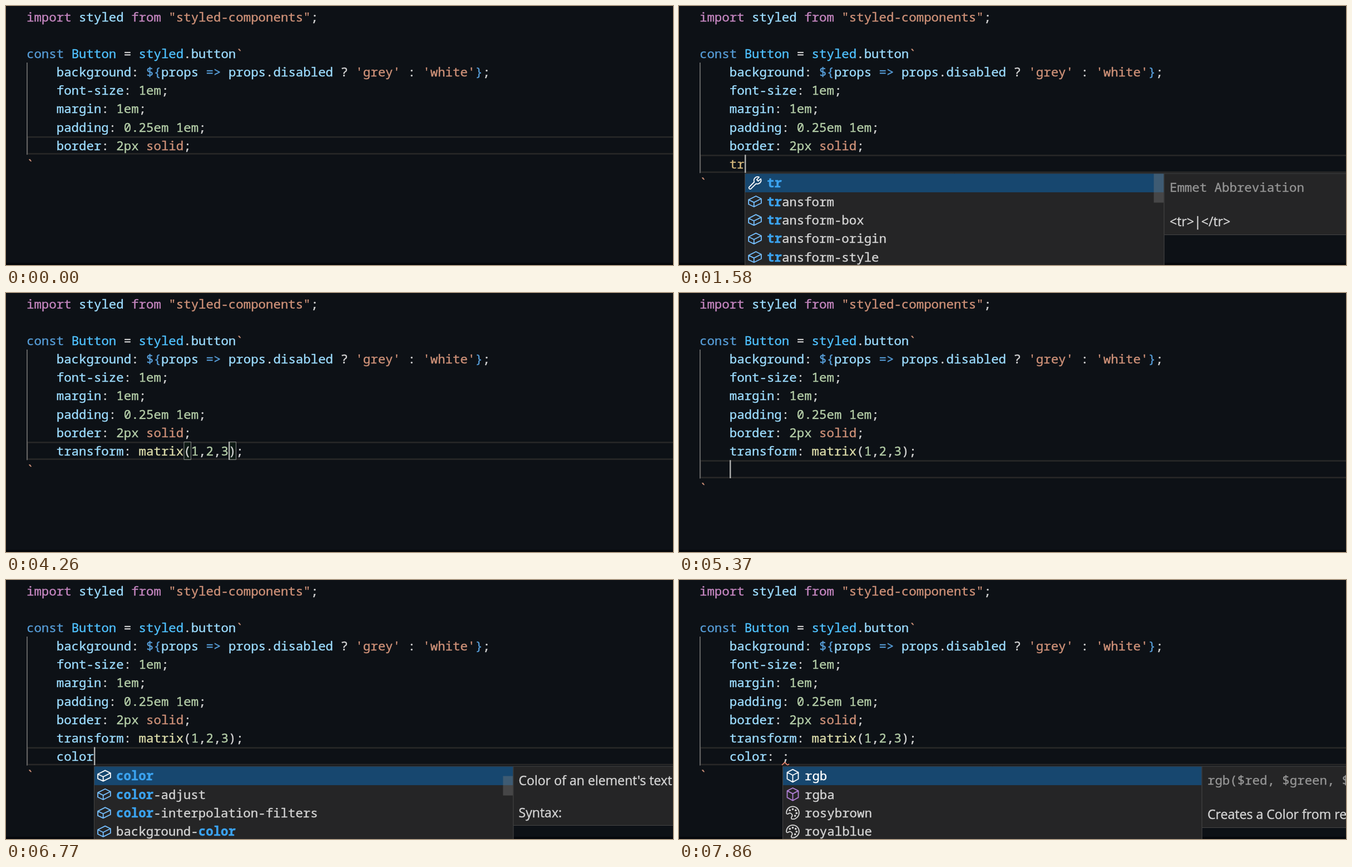
These frames come from a looping animation (1199 px wide and 467 px high, 8000 ms). An HTML page with a canvas:

```html
<!DOCTYPE html>
<html lang="en">
<head>
<meta charset="utf-8">
<title>Editor</title>
<style>
html, body { margin: 0; width: 100%; height: 100%; overflow: hidden; background: #0d1116; }
canvas { display: block; width: 1199px; height: 467px; }
</style>
</head>
<body>
<canvas id="stage"></canvas>
<script>
const W = 1199, H = 467, LOOP = 8000;
const LEFT = 37, ADV = 13.44, TOP = 2.8, LINE = 33.17, ROW = 33.4;
const MONO = '22.4px "Noto Sans Mono", "DejaVu Sans Mono", monospace';
const SANS = '23.1px "Open Sans", "Noto Sans", sans-serif';
const C = {
  key: '#c586c0', prop: '#9cdcfe', str: '#ce9178', kw: '#569cd6', name: '#4fc1ff',
  text: '#d4d4d4', num: '#b5cea8', fn: '#dcdcaa', tag: '#d7ba7d',
  hit: '#3ba3f0', field: '#75beff', method: '#b180d7', error: '#f0846c'
};

const canvas = document.getElementById('stage');
const dpr = window.devicePixelRatio || 1;
canvas.width = W * dpr;
canvas.height = H * dpr;
const ctx = canvas.getContext('2d');

const colX = col => LEFT + col * ADV;
const rowY = row => TOP + row * LINE;

// Code lines are flat lists: colour, text, colour, text, ...
const rule = (prop, ...value) => ['prop', '    ' + prop, 'text', ': ', ...value, 'text', ';'];
const typed = (word, color = 'text') => [color, '    ' + word];
const matrix = args => rule('transform', 'fn', 'matrix', 'text', '(',
  ...[...args].flatMap(ch => [ch === ',' ? 'text' : 'num', ch]), 'text', ')');

const BASE = [
  ['key', 'import ', 'prop', 'styled ', 'key', 'from ', 'str', '"styled-components"', 'text', ';'],
  [],
  ['kw', 'const ', 'name', 'Button ', 'text', '= ', 'name', 'styled', 'text', '.', 'prop', 'button', 'str', '`'],
  rule('background', 'kw', '${', 'prop', 'props ', 'kw', '=> ', 'prop', 'props', 'text', '.',
    'prop', 'disabled ', 'text', '? ', 'str', "'grey' ", 'text', ': ', 'str', "'white'", 'kw', '}'),
  rule('font-size', 'num', '1em'),
  rule('margin', 'num', '1em'),
  rule('padding', 'num', '0.25em 1em'),
  rule('border', 'num', '2px ', 'str', 'solid')
];

const list = (x, icons, labels, more) => ({ x, icons: icons.split(' '), labels: labels.split(' '), hit: '', ...more });

const tagList = list(118, 'wrench field field field field',
  'tr transform transform-box transform-origin transform-style',
  { hit: 'tr', bar: [1, 52], detail: 'Emmet Abbreviation', doc: '<tr>|</tr>' });
const transformList = hit => list(colX(4 + hit.length), 'field field field field field',
  'transform transform-box transform-origin transform-style ' + (hit === 'tra' ? 'translate' : 'transition'),
  { hit, bar: [1, 52], info: "A two-dimensional transformation is applied" });
const valueList = list(238, 'value value value value value',
  'matrix() matrix3d() none perspective() rotate()', { bar: [48, 130] });
const colorList = hit => list(hit === 'co' ? 118 : colX(4 + hit.length), 'field field field field',
  'color color-adjust color-interpolation-filters ' + (hit === 'color' ? 'background-color' : 'column-count'),
  { hit, bar: [18, 35], info: "Color of an element's text" });
const rgbList = list(186, 'method method color color', 'rgb rgba rosybrown royalblue',
  { detail: 'rgb($red, $green, $blue)', doc: 'Creates a Color from red, green, blue' });

const START = { row: 7, col: 22, caret: false, extra: [], popup: null, wave: null, pair: null };
const done = matrix('1,2,3');
const type = (line, col, more) => ({ extra: [line], col, caret: true, ...more });
const args = s => type(matrix(s), 22 + s.length, { pair: [21, 22 + s.length] });
const next = (line, col, more) => ({ extra: [done, line], col, caret: true, ...more });

const EVENTS = [
  [180, { caret: true }],
  [650, { caret: false }],
  [980, type([], 4, { row: 8 })],
  [1380, type(typed('t'), 5)],
  [1480, type(typed('tr', 'tag'), 6)],
  [1580, { popup: tagList }],
  [1640, type(typed('tra'), 7, { popup: transformList('tra') })],
  [1760, type(typed('tran'), 8, { popup: transformList('tran') })],
  [2130, { wave: [9, 0] }],
  [2190, { caret: false }],
  [2490, type(typed('transform', 'prop'), 13, { popup: null })],
  [2550, type(rule('transform'), 15, { popup: valueList })],
  [2860, { wave: [8, 15] }],
  [2980, { caret: false }],
  [3220, { ...args(''), popup: null, wave: null, pair: null }],
  [3280, { pair: [21, 22] }],
  [3660, args('1')],
  [3960, args('1,')],
  [4060, args('1,2')],
  [4160, args('1,2,')],
  [4260, args('1,2,3')],
  [4770, { caret: false }],
  [4930, { col: 29, caret: true }],
  [4990, { pair: null }],
  [5370, next([], 4, { row: 9 })],
  [5850, { caret: false }],
  [6290, next(typed('c'), 5)],
  [6350, next(typed('co'), 6)],
  [6410, { popup: colorList('co') }],
  [6470, next(typed('col'), 7, { popup: colorList('col') })],
  [6620, next(typed('colo'), 8, { popup: colorList('colo') })],
  [6770, next(typed('color', 'prop'), 9, { popup: colorList('color') })],
  [7200, { caret: false }],
  [7260, { wave: [10, 0] }],
  [7320, { popup: null }],
  [7440, next(rule('color'), 11, { popup: rgbList })],
  [7800, { wave: [9, 11] }],
  [7860, { caret: false }]
];

const stateAt = t => Object.assign({}, START, ...EVENTS.filter(e => e[0] <= t).map(e => e[1]));

function box(x, y, w, h, color) {
  ctx.fillStyle = color;
  ctx.fillRect(x, y, w, h);
}

function frame(x, y, w, h, color) {
  ctx.strokeStyle = color;
  ctx.lineWidth = 1;
  ctx.strokeRect(x + 0.5, y + 0.5, w - 1, h - 1);
}

// A hairline stroke gives the glyphs their slightly heavy weight.
function label(s, x, y, color, font = MONO) {
  ctx.font = font;
  ctx.fillStyle = ctx.strokeStyle = color;
  ctx.lineWidth = 0.4;
  ctx.lineJoin = 'round';
  ctx.fillText(s, x, y);
  ctx.strokeText(s, x, y);
}

function codeLine(tokens, row) {
  let col = 0;
  for (let i = 0; i < tokens.length; i += 2) {
    label(tokens[i + 1], colX(col), rowY(row) + 24.7, C[tokens[i]]);
    col += tokens[i + 1].length;
  }
}

function wave([row, col]) {
  const x = colX(col), y = rowY(row) + 30;
  ctx.beginPath();
  for (let d = 0; d <= ADV; d += 0.5) ctx.lineTo(x + d, y + 1.9 * Math.cos(d * Math.PI * 2 / 10.5));
  ctx.strokeStyle = C.error;
  ctx.lineWidth = 1.7;
  ctx.stroke();
}

// Icons live on a 16-unit grid.
const BRICK = 'M1.5 6.3L9 2.5 14.5 5.2V9.8L7 13.5 1.5 10.9zL7 9 14.5 5.2M7 9V13.5';
const ICONS = {
  field: [C.field, BRICK],
  method: [C.method, 'M8 1.5L13.7 4.4V11.3L8 14.5 2.3 11.3V4.4zM2.3 4.4L8 7.4 13.7 4.4M8 7.4V14.5'],
  value: [C.field, 'M4 3.5H1.3V12.5H4M12 3.5H14.7V12.5H12M4.2 7.2L8.6 5.2 11.8 6.6V8.9L7.4 10.9 4.2 9.5zL7.4 8.6 11.8 6.6M7.4 8.6V10.9'],
  wrench: [C.field, 'M12.3 2A3.8 3.8 0 0 0 7.3 7L2 12.3A1.3 1.3 0 0 0 3.8 14.1L9.2 8.8A3.8 3.8 0 0 0 14 3.8L11.4 6.2 9.9 4.6z'],
  color: [C.text, 'M8 1.5A6.5 6.5 0 0 0 1.5 8v.4c.1 .9 1.3 1.1 2.1 .4a2.4 2.4 0 0 1 3.4 3.3c-.8 .9-.6 2.3 .5 2.4h.5a6.5 6.5 0 1 0 0-13z']
};
const DOTS = [[5, 5.4], [8, 4.2], [11, 5.4], [11.9, 8.3], [10.4, 11]];

function icon(kind, x, y, selected) {
  const [color, path] = ICONS[kind];
  ctx.save();
  ctx.translate(x, y);
  ctx.scale(1.75, 1.75);
  ctx.strokeStyle = ctx.fillStyle = selected ? '#fff' : color;
  ctx.lineWidth = 1.05;
  ctx.stroke(new Path2D(path));
  if (kind === 'color') for (const [dx, dy] of DOTS) {
    ctx.beginPath();
    ctx.arc(dx, dy, 1.05, 0, Math.PI * 2);
    ctx.fill();
  }
  ctx.restore();
}

function drawList(p, top) {
  const w = 754.5, x = p.x;
  box(x, top, w, H - top, '#252526');
  frame(x, top, w, H, '#454545');
  box(x + 1, top + 1, w - 1, ROW, '#17476f');
  p.labels.forEach((s, i) => {
    const mid = top + 17.8 + i * ROW, base = mid + 7.9, tx = x + 40;
    icon(p.icons[i], x + 4.5, mid - 14.3, i === 0);
    const at = p.hit ? s.indexOf(p.hit) : -1, n = at < 0 ? 0 : p.hit.length, from = Math.max(at, 0);
    const color = i ? C.text : '#fff';
    label(s.slice(0, from), tx, base, color);
    label(s.slice(from, from + n), tx + from * ADV, base, C.hit, 'bold ' + MONO);
    label(s.slice(from + n), tx + (from + n) * ADV, base, color);
  });
  if (p.bar) box(x + w - 19, top + p.bar[0], 18, p.bar[1], 'rgba(121,121,121,.4)');
  if (p.detail || p.info) drawDetail(p, x + w - 1, top);
}

function drawDetail(p, x, top) {
  const h = p.detail ? 111.5 : 107.5;
  box(x, top, 577, h, '#252526');
  frame(x, top, 577, h, '#454545');
  if (p.detail) {
    label(p.detail, x + 10.5, top + 33, '#959595');
    label(p.doc, x + 10.5, top + 95.5, C.text, SANS);
  } else {
    label(p.info, x + 10, top + 34.5, C.text, SANS);
    label('Syntax:', x + 10, top + 92, C.text, SANS);
  }
}

function draw(t) {
  const s = stateAt(t), lines = [...BASE, ...s.extra], y = rowY(s.row);
  ctx.setTransform(dpr, 0, 0, dpr, 0, 0);
  box(0, 0, W, H, '#0d1116');
  box(0, 463, W, 4, '#06080c');

  box(LEFT, y, W, 2.6, '#282828');
  box(LEFT, y + LINE - 3, W, 2.6, '#282828');
  box(LEFT, y, 2.6, LINE - 0.4, '#282828');
  box(LEFT, 102, 1.7, rowY(lines.length) - 102, '#707070');

  if (s.pair) for (const col of s.pair) {
    box(colX(col), y, ADV, LINE, 'rgba(0,100,0,.1)');
    frame(Math.round(colX(col)) + 0.5, Math.round(y), 13.5, 33, '#888');
  }
  lines.forEach(codeLine);
  codeLine(['str', '`'], lines.length);
  if (s.wave) wave(s.wave);
  if (s.popup) drawList(s.popup, Math.round(rowY(s.row + 1)) + 0.5);
  if (s.caret) box(Math.round(colX(s.col)), y, 2.4, LINE - 0.5, '#aeafad');
}

const begin = performance.now();
function tick() {
  draw((performance.now() - begin) % LOOP);
  requestAnimationFrame(tick);
}
tick();
</script>
</body>
</html>
```
